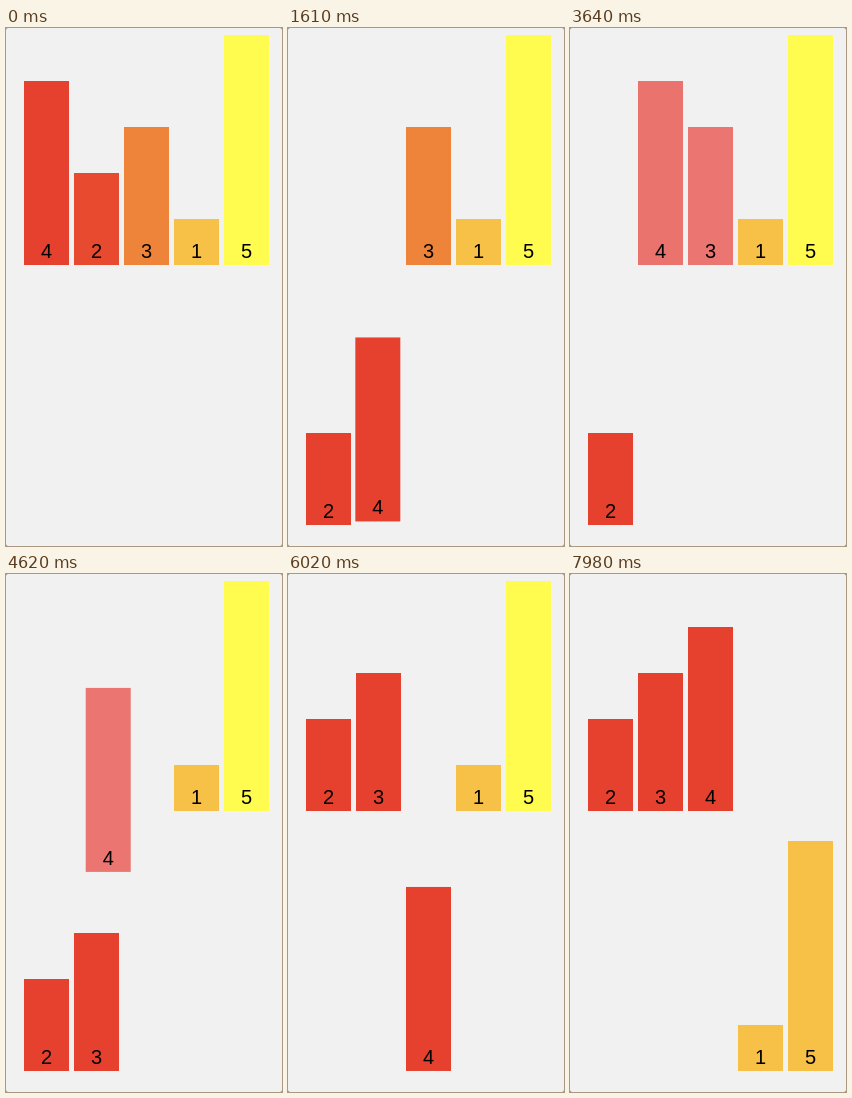
Write an HTML page that moves like this. It is 276x518 px and loops after 8000 ms.

```html
<!DOCTYPE html>
<html lang="en">
<head>
<meta charset="utf-8">
<title>Merge sort</title>
<style>
  html, body { margin: 0; width: 100%; height: 100%; overflow: hidden; background: #777; }
  #stage {
    position: relative; width: 276px; height: 518px; overflow: hidden;
    background: #f1f1f1; border-radius: 2px;
  }
  .bar {
    position: absolute; left: 0; top: 0; width: 45px;
    display: flex; align-items: flex-end; justify-content: center;
    font: 20px/28px "Liberation Sans", Arial, sans-serif; color: #000;
  }
</style>
</head>
<body>
<div id="stage"></div>
<script>
const LOOP = 8000, MOVE = 420;
const RED = [230, 65, 46], PINK = [234, 117, 113];
const AMBER = [247, 192, 70], PALE = [255, 251, 152];

const bars = {};
[[4, RED], [2, [232, 74, 48]], [3, [238, 132, 57]], [1, AMBER], [5, [255, 251, 79]]]
  .forEach(([value, color], slot) => {
    const el = document.createElement('div');
    el.className = 'bar';
    el.textContent = value;
    el.style.height = value * 46 + 'px';
    document.getElementById('stage').append(el);
    bars[value] = { value, el, home: [slot, 0], color, moves: [], tints: [] };
  });

const tint = (value, at, color, span = 150) => bars[value].tints.push({ at, span, to: color });
const move = (value, at, slot, row) => bars[value].moves.push({ at, span: MOVE, to: [slot, row] });

// Dropping to the lower row also settles the bar into its group's colour.
function drop(value, at, slot, color) {
  move(value, at, slot, 1);
  tint(value, at + MOVE * 0.35, color, MOVE * 0.5);
}
const lift = (value, at, slot) => move(value, at, slot, 0);

// [4] + [2]
tint(4, 400, PINK);
tint(2, 400, PINK);
drop(2, 800, 0, RED);
drop(4, 1220, 1, RED);
lift(2, 1850, 0);
lift(4, 2270, 1);

// [2 4] + [3]
tint(2, 2720, PINK);
tint(3, 2720, PINK);
drop(2, 3071, 0, RED);
tint(4, 3510, PINK);
drop(3, 4065, 1, RED);
drop(4, 4489, 2, RED);
lift(2, 5175, 0);
lift(3, 5597, 1);
lift(4, 6018, 2);

// [1] + [5]
tint(1, 6740, PALE);
tint(5, 6740, PALE);
drop(1, 7040, 3, AMBER);
drop(5, 7460, 4, AMBER);

const ease = t => t * t * (3 - 2 * t);

function valueAt(start, steps, time) {
  return steps.reduce((from, { at, span, to }) => {
    const k = ease(Math.min(1, Math.max(0, (time - at) / span)));
    return from.map((v, i) => v + (to[i] - v) * k);
  }, start);
}

function draw(time) {
  for (const { value, el, home, color, moves, tints } of Object.values(bars)) {
    const [slot, row] = valueAt(home, moves, time);
    const x = 18 + slot * 50;
    const y = 237 + row * 260 - value * 46;
    el.style.transform = `translate(${x}px, ${y}px)`;
    el.style.backgroundColor = `rgb(${valueAt(color, tints, time).map(Math.round)})`;
  }
}

const begin = performance.now();
function frame() {
  draw((performance.now() - begin) % LOOP);
  requestAnimationFrame(frame);
}
frame();
</script>
</body>
</html>
```
